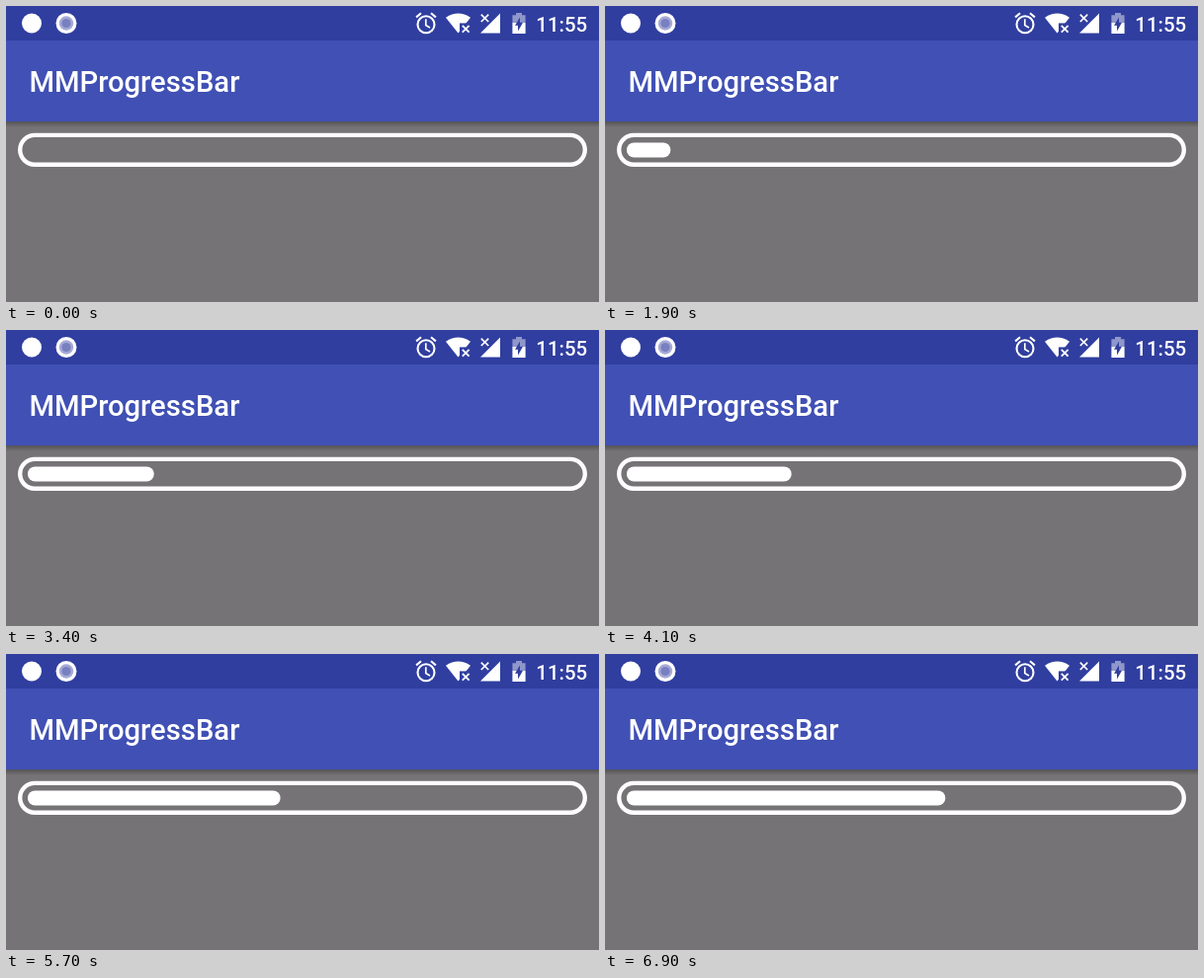
Write an HTML page with a canvas that moves like this. It is 600 by 300 pixels and loops after 6950 ms.

```html
<!DOCTYPE html>
<html lang="en">
<head>
<meta charset="utf-8">
<title>Progress bar</title>
<style>
html, body { margin: 0; width: 600px; height: 300px; overflow: hidden; background: #757375; }
canvas { display: block; width: 600px; height: 300px; }
</style>
</head>
<body>
<canvas id="stage" width="600" height="300"></canvas>
<script>
const ctx = document.getElementById('stage').getContext('2d');
const LOOP = 6950, START = 1100, STEP = 100;
const STATUS = '#303e9f', TOOLBAR = '#4050b4', PAGE = '#757375', WHITE = '#fff';

function rect(x, y, w, h, color) {
  ctx.fillStyle = color;
  ctx.fillRect(x, y, w, h);
}

function disc(x, y, r, color) {
  ctx.fillStyle = color;
  ctx.beginPath();
  ctx.arc(x, y, r, 0, Math.PI * 2);
  ctx.fill();
}

function shape(d, color) {
  ctx.fillStyle = color;
  ctx.fill(new Path2D(d));
}

function line(d, width, color = WHITE) {
  ctx.strokeStyle = color;
  ctx.lineWidth = width;
  ctx.stroke(new Path2D(d));
}

function pill(x, y, w, h, r) {
  ctx.beginPath();
  ctx.roundRect(x, y, w, h, r);
}

function label(text, x, y, size) {
  ctx.font = `500 ${size}px Roboto, sans-serif`;
  ctx.fillStyle = WHITE;
  ctx.fillText(text, x, y);
}

function drawAlarm() {
  ctx.strokeStyle = WHITE;
  ctx.lineWidth = 2.1;
  ctx.beginPath();
  ctx.arc(425, 18.7, 8.5, 0, Math.PI * 2);
  ctx.stroke();
  line('M415.1 11.4L420 7.3M434.9 11.4L430 7.3', 2.1);
  line('M424.8 13.2V19.4L429 21.9', 1.7);
}

function drawWifi() {
  shape('M445 11.8Q457.5 3.4 470 11.8L457.5 27.6Z', WHITE);
  shape('M459 17.4H472V29H459Z', STATUS);
  line('M461.8 19.8L468.6 26.6M468.6 19.8L461.8 26.6', 1.9);
}

function drawSignal() {
  shape('M500 7.5V27.5H480Z', WHITE);
  line('M480.8 8.6L488.2 16M488.2 8.6L480.8 16', 1.7);
}

function drawBattery() {
  shape('M516 7H522V9.2H525.6V17H512.4V9.2H516Z', '#8f97cb');
  rect(512.4, 17, 13.2, 11, WHITE);
  shape('M520 11.6V16.8H523L518 25.4V19.8H515Z', STATUS);
}

function drawStatusBar() {
  rect(0, 0, 600, 35, STATUS);
  disc(26, 17.5, 10, WHITE);
  disc(61, 17.5, 10.5, WHITE);
  disc(61, 17.5, 7.2, '#a5a9d6');
  disc(61, 17.5, 4.6, '#7980bf');
  drawAlarm();
  drawWifi();
  drawSignal();
  drawBattery();
  label('11:55', 536.3, 25.7, 20.4);
}

function drawToolbar() {
  rect(0, 35, 600, 82, TOOLBAR);
  const shadow = ctx.createLinearGradient(0, 117, 0, 123);
  shadow.addColorStop(0, 'rgba(0,0,0,.28)');
  shadow.addColorStop(1, 'rgba(0,0,0,0)');
  rect(0, 117, 600, 6, shadow);
  label('MMProgressBar', 23.4, 87.2, 29.2);
}

function drawProgress(percent) {
  ctx.strokeStyle = '#fefcfe';
  ctx.lineWidth = 4.4;
  pill(14.2, 130.9, 571.6, 29.8, 14.9);
  ctx.stroke();
  if (percent > 0) {
    ctx.fillStyle = WHITE;
    pill(21.9, 138.4, 5.56 * percent, 15, 7.5);
    ctx.fill();
  }
}

function draw(t) {
  const percent = Math.max(0, Math.floor((t - START) / STEP));
  rect(0, 0, 600, 300, PAGE);
  drawStatusBar();
  drawToolbar();
  drawProgress(percent);
}

let origin;
function tick(now) {
  origin ??= now;
  draw((now - origin) % LOOP);
  requestAnimationFrame(tick);
}
draw(0);
requestAnimationFrame(tick);
</script>
</body>
</html>
```
